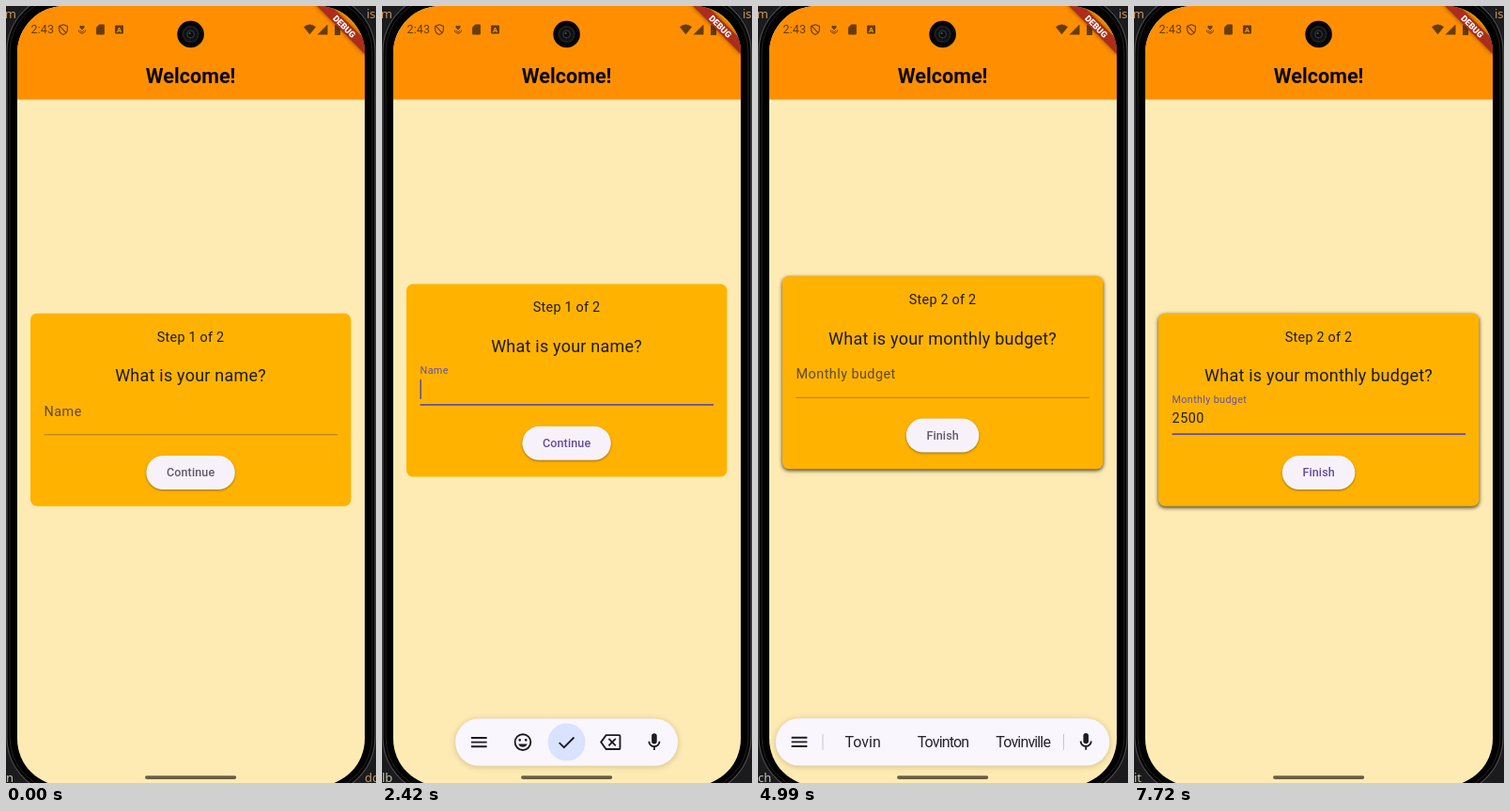
Write an HTML page with a canvas that moves like this. It is 394 px wide and 826 px high and loops after 8000 ms.

```html
<!DOCTYPE html>
<html lang="en">
<head>
<meta charset="utf-8">
<title>Welcome form</title>
<style>
  html, body { margin: 0; width: 100%; height: 100%; overflow: hidden; background: #1b1b1d; }
  canvas { display: block; width: 394px; height: 826px; }
</style>
</head>
<body>
<canvas id="stage"></canvas>
<script>
const W = 394, H = 826, LOOP = 8000, MID = 196.6;
const canvas = document.getElementById('stage');
const ctx = canvas.getContext('2d');
const ratio = window.devicePixelRatio || 1;
canvas.width = W * ratio;
canvas.height = H * ratio;

const SANS = 'Roboto, sans-serif';
const INK = '#1d1b20', PURPLE = '#6750a4', CARD = '#ffb300', STATUS = '#663c08';
const NAME = 'Tovin';
const HINTS = [NAME, NAME + 'ton', NAME + 'ville'];

// Moving phases as [start, end, step]; time is held between steps.
const PHASES = [[1120, 1280, 80], [2140, 2700, 70], [2760, 3180, 70], [4920, 4990, 70], [5850, 5990, 70]];
const CURSOR_ON = [[1120, 1610], [2140, 3580], [4040, 4520], [5850, 6320], [6650, 7720]];
const NAME_KEYS = [2560, 2700, 2830, 2970, 3110];
const BUDGET_KEYS = [6650, 6850, 7130, 7260];

const clamp = x => Math.max(0, Math.min(1, x));
const span = (t, a, b) => clamp((t - a) / (b - a));
const smooth = x => x * x * (3 - 2 * x);
const easeOut = (x, n) => 1 - Math.pow(1 - x, n);
const mix = (a, b, p) => a + (b - a) * p;
const typed = (text, keys, t) => text.slice(0, keys.filter(k => t >= k).length);

function hold(t) {
  const phase = PHASES.find(([a, b]) => t >= a && t < b);
  if (!phase) return t;
  const [a, , step] = phase;
  return a + Math.floor((t - a) / step) * step;
}

function box(x, y, w, h, r, fill) {
  ctx.beginPath();
  ctx.roundRect(x, y, w, h, r);
  if (fill) { ctx.fillStyle = fill; ctx.fill(); }
}

function disc(x, y, r, fill) {
  ctx.beginPath();
  ctx.arc(x, y, r, 0, 7);
  ctx.fillStyle = fill;
  ctx.fill();
}

function setFont(size, weight = 400, spacing = 0, family = SANS) {
  ctx.font = `${weight} ${size}px ${family}`;
  ctx.letterSpacing = spacing + 'px';
}

function write(text, x, y, color, align = 'left') {
  ctx.textAlign = align;
  ctx.fillStyle = color;
  ctx.fillText(text, x, y);
}

function shaded(color, blur, dy, draw) {
  ctx.save();
  ctx.shadowColor = color;
  ctx.shadowBlur = blur * ratio;
  ctx.shadowOffsetY = dy * ratio;
  draw();
  ctx.restore();
}

// Icons live on a 24-unit grid centred on the given point.
const ICONS = {
  menu: { line: 'M3 7H21M3 12H21M3 17H21' },
  face: {
    line: 'M21 12A9 9 0 1 1 3 12A9 9 0 1 1 21 12Z',
    fill: 'M7 9.5a1.5 1.5 0 1 0 3 0a1.5 1.5 0 1 0-3 0M14 9.5a1.5 1.5 0 1 0 3 0a1.5 1.5 0 1 0-3 0M6.9 14H17.1A5.5 5.5 0 0 1 6.9 14Z'
  },
  check: { line: 'M3.5 12.5L9 18L20.5 6.5' },
  erase: { line: 'M7 4H22Q23 4 23 5V19Q23 20 22 20H7L1.2 12ZM10 8L18 16M18 8L10 16' },
  mic: {
    line: 'M6 11A6 6 0 0 0 18 11M12 17V21',
    fill: 'M9 5A3 3 0 0 1 15 5V11A3 3 0 0 1 9 11Z'
  },
  shield: { line: 'M12 2.5L20 5.5V11Q20 18.5 12 22Q4 18.5 4 11V5.5ZM5 5L18 19' },
  care: {
    line: 'M4 13Q5 20 12 21Q19 20 20 13M8 14L12 18L16 14',
    fill: 'M12 13L7 8A3 3 0 0 1 12 4.5A3 3 0 0 1 17 8Z'
  },
  sd: { fill: 'M10 2H18Q20 2 20 4V20Q20 22 18 22H6Q4 22 4 20V8Z' },
  wifi: { fill: 'M12 21L0.5 7Q12-2 23.5 7Z' },
  signal: { fill: 'M2 22H22V2Z' },
  battery: { fill: 'M10 2H14V4H17V22H7V4H10Z' }
};
for (const icon of Object.values(ICONS))
  for (const kind in icon) icon[kind] = new Path2D(icon[kind]);

function drawIcon(name, x, y, scale, color, alpha = 1) {
  const { line, fill } = ICONS[name];
  ctx.save();
  ctx.globalAlpha *= alpha;
  ctx.translate(x, y);
  ctx.scale(scale, scale);
  ctx.translate(-12, -12);
  ctx.lineWidth = 2;
  ctx.fillStyle = ctx.strokeStyle = color;
  if (fill) ctx.fill(fill);
  if (line) ctx.stroke(line);
  ctx.restore();
}

function drawDesk(t) {
  ctx.fillStyle = '#1b1b1d';
  ctx.fillRect(0, 0, W, H);
  setFont(13, 400, 0, '"Noto Sans", sans-serif');
  write('om', 11, 13, '#c9975f', 'right');
  write('is', 384, 13, '#c9975f');
  const left = t < 1120 ? 'n' : t < 2490 ? 'lb' : t < 5850 ? 'ch' : 'it';
  write(left, 0, 825, '#c8c3b4');
  if (t < 1120) write('dd', 382, 825, '#c9975f');
}

function drawBody() {
  box(1, -13, 392, 852, 62, '#000');
  ctx.lineWidth = 1.2;
  ctx.strokeStyle = '#4a4a4c';
  ctx.stroke();
  box(4, -9, 386, 844, 58);
  ctx.lineWidth = 1;
  ctx.strokeStyle = '#242426';
  ctx.stroke();
}

function drawHeader() {
  ctx.fillStyle = '#ff8f00';
  ctx.fillRect(12, 0, 370, 99.5);
  setFont(21.6, 700);
  write('Welcome!', MID, 82, '#0b0805', 'center');
  setFont(12.6, 400, 0.1);
  write('2:43', 26.5, 29.4, STATUS);
  drawIcon('shield', 61, 25, 0.55, STATUS);
  drawIcon('care', 81, 25, 0.48, STATUS);
  drawIcon('sd', 100.5, 25, 0.55, STATUS);
  box(116, 20.5, 9, 9, 1, STATUS);
  setFont(7.5, 700);
  write('A', 120.5, 27.7, '#ff9d20', 'center');
  drawIcon('wifi', 323.5, 25, 0.57, STATUS);
  drawIcon('signal', 337, 25, 0.55, STATUS);
  drawIcon('battery', 353, 25, 0.6, STATUS);
}

function drawRibbon() {
  ctx.save();
  ctx.translate(382, 0);
  ctx.rotate(Math.PI / 4);
  shaded('rgba(0,0,0,.5)', 5, 0, () => {
    ctx.fillStyle = '#ac2d1c';
    ctx.fillRect(-38, 25.2, 76, 10.8);
  });
  setFont(9.2, 900);
  write('DEBUG', 0, 34, '#fff', 'center');
  ctx.restore();
}

function drawCamera() {
  disc(MID, 30, 14.3, '#050506');
  disc(MID, 30, 9, '#222325');
  disc(MID, 30, 7.5, '#101113');
  disc(MID, 30, 4.5, '#2c2e31');
  disc(MID, 30, 3, '#0b0b0d');
  disc(MID - 1, 29, 1, '#50545a');
}

function drawField(label, text, float, cursor) {
  const active = float > 0;
  ctx.save();
  ctx.translate(40.6, mix(435.6, 422.2, float));
  const scale = mix(1, 0.75, float);
  ctx.scale(scale, scale);
  setFont(14.4, 400, 0.45);
  write(label, 0, 0, active ? PURPLE : '#5f4a2a');
  ctx.restore();

  ctx.fillStyle = active ? PURPLE : '#a5782a';
  if (active) ctx.fillRect(40.6, 454.2, 312.5, 1.8);
  else ctx.fillRect(40.6, 455.3, 312.5, 0.9);

  setFont(14.4, 400, 0.45);
  write(text, 40.6, 443, INK);
  if (cursor) {
    ctx.fillStyle = PURPLE;
    ctx.fillRect(40.4 + ctx.measureText(text).width, 428, 1.6, 21);
  }
}

function drawButton(text, lit) {
  setFont(12.6, 500, 0.09);
  const w = ctx.measureText(text).width + 43.2;
  shaded('rgba(0,0,0,.4)', 2.5, 1, () => box(MID - w / 2, 478, w, 36, 18, '#f7f2fa'));
  write(text, MID, 500.4, lit ? '#634e9c' : '#625b6e', 'center');
}

function drawCard(step, question, button, lit, shadow, field) {
  const face = () => box(26, 326.7, 341.4, 205, 7, CARD);
  if (shadow) shaded('rgba(0,0,0,.8)', 4.5, 1.6, face);
  else face();
  setFont(14.4, 400, 0.225);
  write(`Step ${step} of 2`, MID, 356.6, INK, 'center');
  setFont(18, 400, 0.225);
  write(question, MID, 399, INK, 'center');
  drawField(...field);
  drawButton(button, lit);
}

function drawCards(t) {
  const up = 39.5 * smooth(span(t, 2230, 2500)) * (1 - smooth(span(t, 5800, 5910)));
  const cursor = CURSOR_ON.some(([a, b]) => t >= a && t < b);
  const float = start => t < start ? 0 : easeOut(clamp((t - start + 30) / 140), 2);
  ctx.save();
  ctx.translate(0, -up);
  if (t < 4990) {
    const field = ['Name', typed(NAME, NAME_KEYS, t), float(1120), cursor];
    drawCard(1, 'What is your name?', 'Continue', t >= 2350, false, field);
  }
  if (t >= 4920) {
    ctx.globalAlpha = t < 4990 ? 0.5 : 1;
    const field = ['Monthly budget', typed('2500', BUDGET_KEYS, t), float(5850), cursor];
    drawCard(2, 'What is your monthly budget?', 'Finish', t >= 5850, true, field);
  }
  ctx.restore();
}

function drawToolbar(t) {
  if (t < 2140 || t >= 5920) return;
  const rise = easeOut(span(t, 2110, 2470), 3);
  const drop = t >= 5850 ? 40 : 0;
  const top = mix(830, 757.2, rise) + drop;
  const grow = smooth(span(t, 2710, 3090));
  const half = mix(118.5, 177.8, grow);
  const y = top + 25.2, reach = half - 25.2;
  const tools = mix(1, 0.1, span(t, 2690, 2830)) * (1 - span(t, 2830, 2930));
  const hints = span(t, 2930, 3150);

  shaded('rgba(90,70,30,.28)', 6, 1, () => box(MID - half, top, half * 2, 50.4, 25.2, '#f9f6fe'));

  ctx.save();
  ctx.globalAlpha = tools;
  disc(MID, y, 20, '#d9e2ff');
  ctx.restore();
  ['face', 'check', 'erase'].forEach((name, i) =>
    drawIcon(name, MID + (i - 1) * reach / 2, y, 0.93, INK, tools));
  drawIcon('menu', MID - reach, y, 0.93, INK, Math.max(tools, hints));
  drawIcon('mic', MID + reach, y, 0.93, INK);

  if (hints > 0) {
    ctx.save();
    ctx.globalAlpha = hints;
    HINTS.forEach((hint, i) => {
      setFont(16, 400, i ? -0.85 : 0);
      write(hint, 111.6 + i * 85.3, y + 5.6, '#25242a', 'center');
    });
    ctx.fillStyle = '#c9c6d0';
    ctx.fillRect(68.5, y - 8.5, 1, 17);
    ctx.fillRect(325, y - 8.5, 1, 17);
    ctx.restore();
  }
}

function draw(t) {
  ctx.setTransform(ratio, 0, 0, ratio, 0, 0);
  drawDesk(t);
  drawBody();
  ctx.save();
  box(12, 0, 370, 829, 50);
  ctx.clip();
  ctx.fillStyle = '#feebb4';
  ctx.fillRect(12, 0, 370, 829);
  drawHeader();
  drawCards(t);
  drawToolbar(t);
  box(148, 818.3, 97.3, 3.6, 1.8, 'rgba(30,12,0,.64)');
  drawRibbon();
  ctx.restore();
  drawCamera();
}

const start = performance.now();
function tick() {
  draw(hold((performance.now() - start) % LOOP));
  requestAnimationFrame(tick);
}
tick();
</script>
</body>
</html>
```
